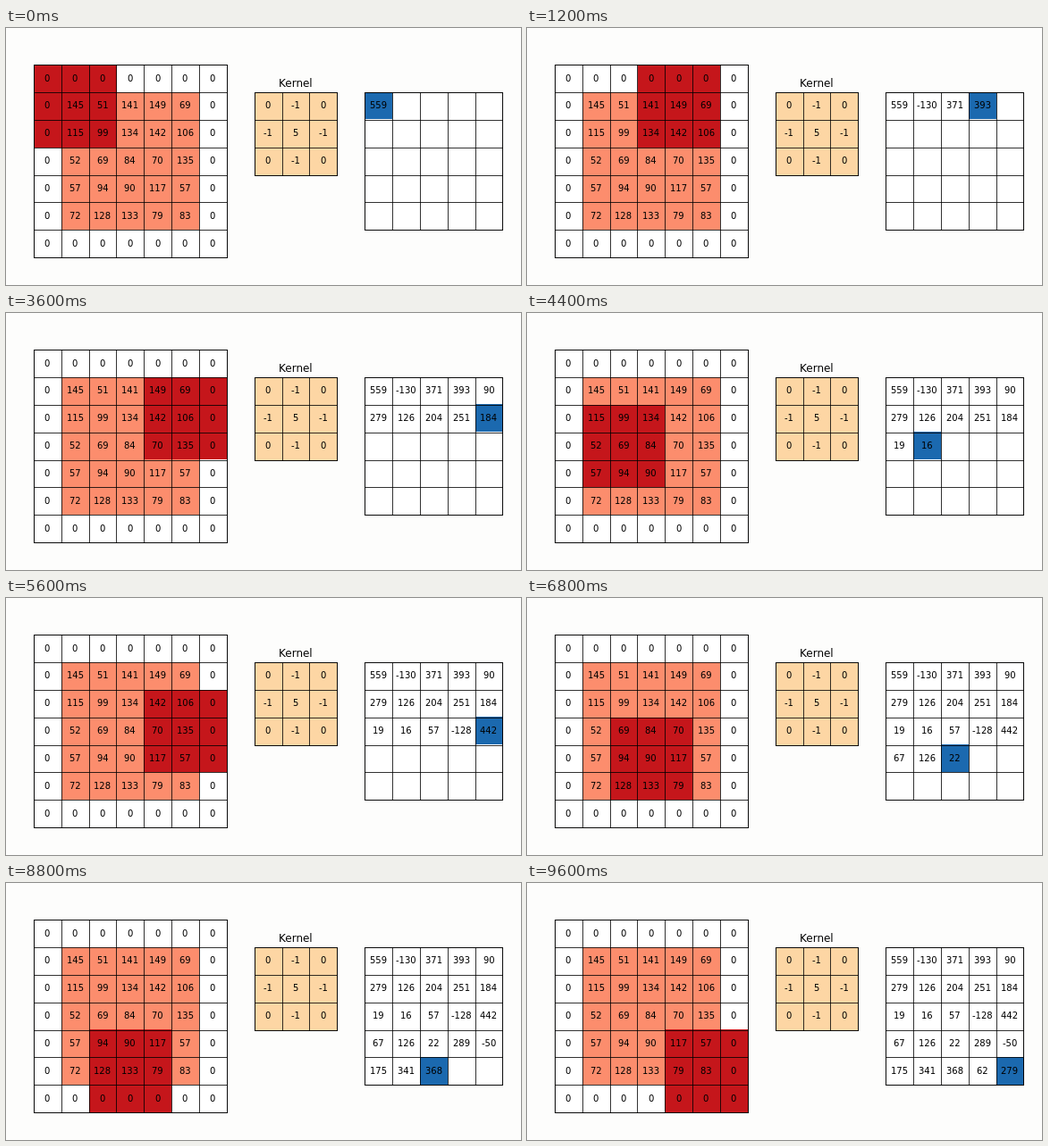
An HTML page with a canvas for the animation above (10 s loop, 576 by 288 pixels).

```html
<!DOCTYPE html>
<html lang="en">
<head>
<meta charset="utf-8">
<title>Convolution</title>
<style>
html, body { margin: 0; width: 576px; height: 288px; overflow: hidden; background: #fdfdfc; }
canvas { display: block; }
</style>
</head>
<body>
<canvas id="stage" width="576" height="288"></canvas>
<script>
const ctx = document.getElementById('stage').getContext('2d');
const CELL = 216 / 7, STEP_MS = 400;
const FONT = '"DejaVu Sans", sans-serif';
const BLACK = '#000', WHITE = '#fff', SALMON = '#fc8d6d', RED = '#c5161b', PEACH = '#fdd6a4', BLUE = '#1b69af';

const pixels = [
  [145, 51, 141, 149, 69],
  [115, 99, 134, 142, 106],
  [52, 69, 84, 70, 135],
  [57, 94, 90, 117, 57],
  [72, 128, 133, 79, 83]
];
const kernel = [[0, -1, 0], [-1, 5, -1], [0, -1, 0]];

const zeros = Array(7).fill(0);
const padded = [zeros, ...pixels.map(row => [0, ...row, 0]), zeros];
const convolve = (r, c) => kernel.reduce((sum, row, i) =>
  sum + row.reduce((s, k, j) => s + k * padded[r + i][c + j], 0), 0);
const result = pixels.map((row, r) => row.map((_, c) => convolve(r, c)));

// All three tables share one lattice of columns and rows.
const latticeX = col => CELL * (col + 1);
const latticeY = row => CELL * (row + 4 / 3);

// Maps cell ranges of a table to whole-pixel rectangles.
function makeFiller(left, top, size, count) {
  const edge = (start, i) => Math.floor(start + size * i / count);
  return (col, row, cols, rows, color) => {
    const x = edge(left, col), y = edge(top, row);
    ctx.fillStyle = color;
    ctx.fillRect(x, y, edge(left, col + cols) - x, edge(top, row + rows) - y);
  };
}
const fillInput = makeFiller(32, 42, 215, 7);
const fillKernel = makeFiller(278, 72, 93, 3);
const fillOutput = makeFiller(402, 72, 154, 5);

function drawGrid(col, row, count) {
  const xs = [], ys = [];
  for (let i = 0; i <= count; i++) {
    xs.push(Math.round(latticeX(col + i)));
    ys.push(Math.round(latticeY(row + i)));
  }
  const w = xs[count] - xs[0], h = ys[count] - ys[0];
  ctx.fillStyle = ctx.strokeStyle = 'rgba(0, 0, 0, .8)';
  ctx.lineWidth = 1;
  for (const x of xs) ctx.fillRect(x, ys[0], 1, h + 1);
  for (const y of ys) ctx.fillRect(xs[0], y, w + 1, 1);
  ctx.strokeRect(xs[0] + .5, ys[0] + .5, w, h);
}

function drawText(text, centerX, baseline, size) {
  ctx.font = `${size}px ${FONT}`;
  ctx.fillStyle = BLACK;
  ctx.fillText(text, Math.round(centerX - ctx.measureText(text).width / 2), Math.round(baseline));
}

function drawNumbers(values, col, row, limit = Infinity) {
  values.flat().slice(0, limit).forEach((value, i) => {
    const c = col + i % values.length, r = row + Math.floor(i / values.length);
    drawText(String(value), latticeX(c + .5), latticeY(r + .5) + 3, 10);
  });
}

function draw(step) {
  const row = Math.floor(step / 5), col = step % 5;
  ctx.fillStyle = '#fdfdfc';
  ctx.fillRect(0, 0, 576, 288);

  fillInput(0, 0, 7, 7, WHITE);
  fillInput(1, 1, 5, 5, SALMON);
  fillInput(col, row, 3, 3, RED);
  fillKernel(0, 0, 3, 3, PEACH);
  fillOutput(0, 0, 5, 5, WHITE);
  fillOutput(col, row, 1, 1, BLUE);

  drawGrid(0, 0, 7);
  drawGrid(8, 1, 3);
  drawGrid(12, 1, 5);

  drawNumbers(padded, 0, 0);
  drawNumbers(kernel, 8, 1);
  drawNumbers(result, 12, 1, step + 1);
  drawText('Kernel', latticeX(9.5), latticeY(1) - 6, 12);
}

function tick() {
  draw(Math.floor(performance.now() / STEP_MS) % 25);
  requestAnimationFrame(tick);
}
tick();
</script>
</body>
</html>
```
